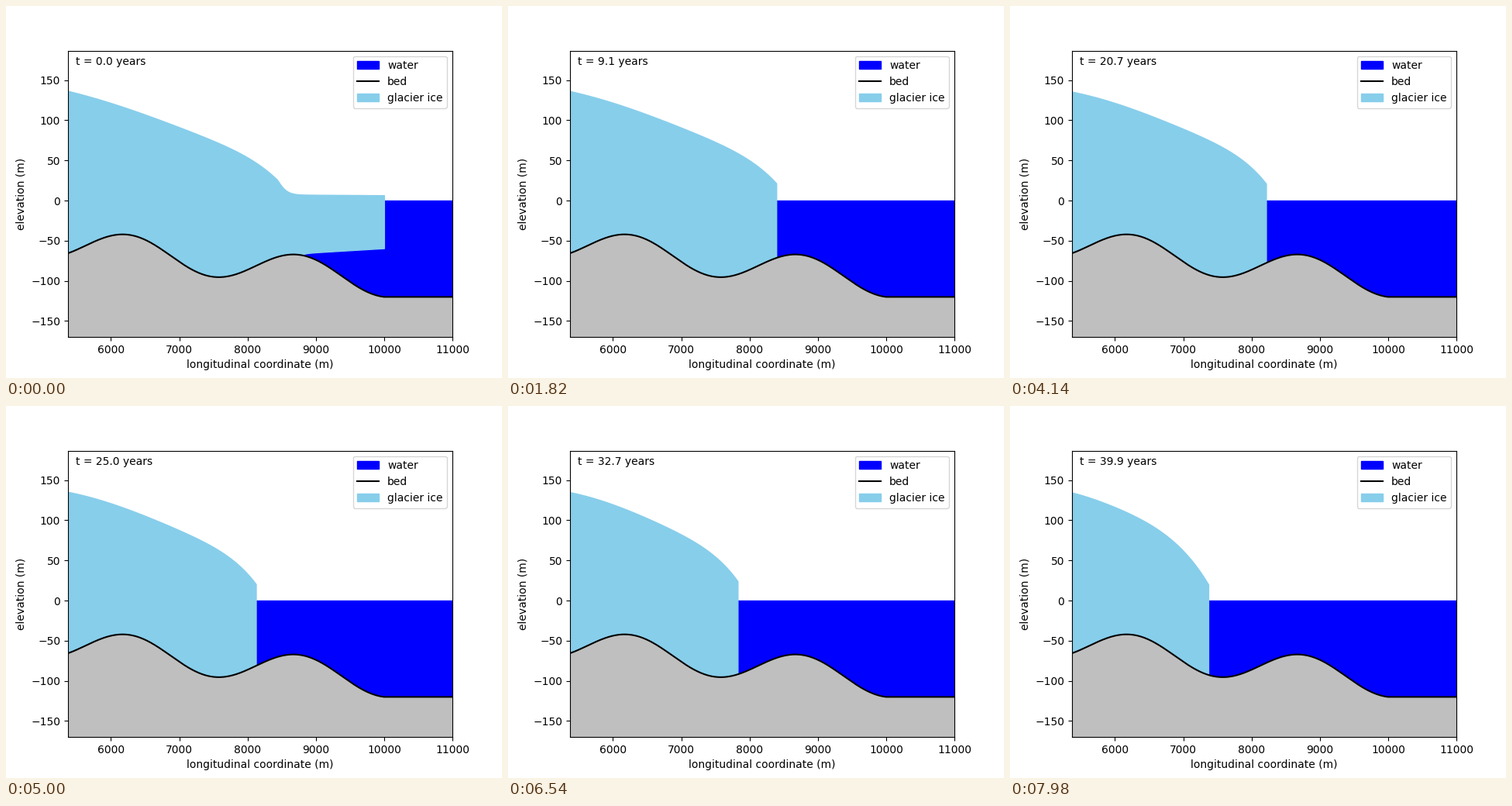
Recreate the animation shown at these times as a matplotlib script. Size 640 px wide and 480 px high, loop 8 s.

```python
import numpy as np
import matplotlib.pyplot as plt
from matplotlib.animation import FuncAnimation

FRAMES, INTERVAL = 400, 20
YEARS_PER_FRAME = 0.1
X0, X1, SHELF_END = 5371, 11000, 10000
Y0, Y1 = -170, 186.7
DRAFT = 9  # depth of floating ice per metre above the water

# a few states of the terminus: year, position, height of the cliff top
YEAR, FRONT, CLIFF = zip((5, 8420, 27), (13.2, 8364, 16), (20.7, 8213, 21),
                         (29.2, 8035, 20), (36.1, 7623, 28), (39.9, 7368, 20))


def bed(x):
    return np.where(x < 10000, -0.01 * x - 20 * np.cos(2 * np.pi * x / 2500), -120)


def grounded_surface(x, year):
    """Straight slope to the cliff plus a bulge that grows with time."""
    front, cliff = np.interp(year, YEAR, FRONT), np.interp(year, YEAR, CLIFF)
    p = np.clip((year - YEAR[0]) / (YEAR[-1] - YEAR[0]), 0, 1)
    s = np.clip((x - X0) / (front - X0), 0, 1)
    upper = 0.42 + 0.22 * np.sqrt(p)
    lower = 0.85 + 0.3 * np.sin(np.pi * p)
    bulge = upper + lower * s ** (4 - 2 * p ** 8)
    summit = 136.5 - 2 * p
    return cliff + (summit - cliff) * (1 - s) * (1 + s * bulge)


def shelf_surface(x):
    """Thin tongue that flattens out beyond the first cliff."""
    d = np.clip(x - FRONT[0], 0, None)
    tongue = 6.6 + 0.9 * (SHELF_END - x) / (SHELF_END - FRONT[0])
    return tongue + (CLIFF[0] - 7.5) * np.exp(-(d / 115) ** 1.3)


def ice_outline(frame):
    """Closed outline of the ice; the shelf breaks off after the first frame."""
    year = frame * YEARS_PER_FRAME
    end = SHELF_END if frame == 0 else np.interp(year, YEAR, FRONT)
    x = np.linspace(X0, end, 400)
    top = grounded_surface(x, year)
    if frame == 0:
        top = np.where(x > FRONT[0], shelf_surface(x), top)
        base = np.maximum(bed(x), -DRAFT * top)
    else:
        base = bed(x)
    return np.vstack([np.column_stack([x, top]),
                      np.column_stack([x, base])[::-1]])


fig, ax = plt.subplots(figsize=(6.4, 4.8), dpi=100)
x = np.linspace(X0, X1, 451)
ax.fill_between(x, bed(x), 0, color="blue", label="water")
ax.plot(x, bed(x), color="black", label="bed")
ice = ax.fill_between(x, bed(x), 0, color="skyblue", label="glacier ice")
ax.fill_between(x, Y0, bed(x), color="0.75")
clock = ax.text(0.02, 0.95, "", transform=ax.transAxes)
ax.set_xlim(X0, X1)
ax.set_ylim(Y0, Y1)
ax.set_xlabel("longitudinal coordinate (m)")
ax.set_ylabel("elevation (m)")
ax.legend(loc="upper right")


def update(frame):
    ice.set_verts([ice_outline(frame)])
    clock.set_text(f"t = {frame * YEARS_PER_FRAME:.1f} years")
    return ice, clock


anim = FuncAnimation(fig, update, frames=FRAMES, interval=INTERVAL,
                     repeat=True, repeat_delay=0)
plt.show()
```
